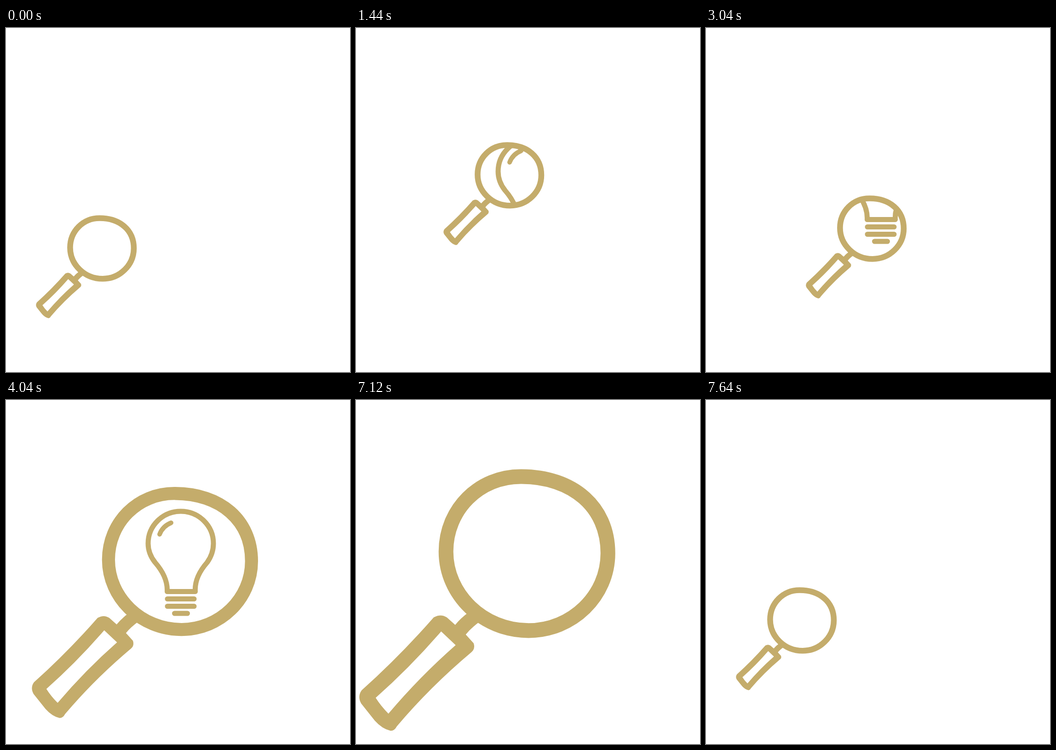
Animation, 748 px wide and 748 px high, one loop 8.64 s. Source, as an HTML page:

```html
<!DOCTYPE html>
<html lang="en">
<head>
<meta charset="utf-8">
<title>Magnifier finds a light bulb</title>
<style>
  html, body { margin: 0; height: 100%; overflow: hidden; background: #fff; }
  svg { display: block; width: 100%; height: 100%; }
  .line { fill: none; stroke: #c4ac6b; stroke-width: 11; stroke-linecap: round; stroke-linejoin: round; }
  .rim { stroke-width: 33.5; }
  .handle { fill: #c4ac6b; fill-rule: evenodd; }
</style>
</head>
<body>
<svg viewBox="0 0 748 748">
  <defs>
    <path id="lens" d="M372 147.5C488 148 568.5 216 568.5 322C568.5 419 487 498 388 498C284 498 200 416 200 318C200 223 275 146.5 372 147.5Z"/>
    <clipPath id="view"><use id="hole" href="#lens"/></clipPath>
  </defs>
  <g clip-path="url(#view)" class="line">
    <g id="bulb">
      <path d="M350.5 416.5Q352 385 324 353Q309 334 309 312A71 70 0 0 1 451 312Q451 334 437.5 353Q409.5 385 411.5 416.5Z"/>
      <path d="M351 432.5H409M351 448.5H409M366.5 464H394.5"/>
      <path d="M334 292Q341 274 359 267" stroke-width="10"/>
    </g>
    <path id="rays"/>
  </g>
  <g id="glass">
    <use href="#lens" class="line rim"/>
    <path class="handle" d="M221 485L202 468Q188 459 172 468Q95 556 8 634Q-2 648 7 664L38 703Q55 722 74 726Q83 726 88 716Q164 626 258 547Q267 540 263 527L245 507Q257 492 279 476L252 456Q233 470 221 485Z
      M189 500L222 531Q140 603 69 687Q52 670 40 651Q118 582 189 500Z"/>
  </g>
</svg>
<script>
  const LOOP = 8640, TICK = 40, SMALL = 0.376;
  const $ = id => document.getElementById(id);

  // Magnifier poses: x, y, scale
  const start = [64.2, 358, SMALL];
  const moves = [
    { at: 1000, steps: 12, to: [189.2, 199, SMALL] },
    { at: 1800, steps: 12, to: [302.2, 146, SMALL] },
    { at: 2600, steps: 12, to: [216.2, 315, SMALL] },
    { at: 3720, steps: 12, to: [0, 0, 1] },
    { at: 7120, steps: 14, to: start }
  ];

  // Linear progress in whole ticks; the first step shows at once.
  const progress = (t, at, steps) =>
    Math.max(0, Math.min(1, (Math.floor((t - at) / TICK) + 1) / steps));

  const polar = (radius, degrees) => {
    const a = degrees * Math.PI / 180;
    return `${379 + radius * Math.cos(a)} ${314 + radius * Math.sin(a)}`;
  };
  $('rays').setAttribute('d', [-225, -180, -135, -90, -45, 0, 45]
    .map(a => `M${polar(102, a)}L${polar(135.5, a)}`).join(''));

  function draw() {
    const t = performance.now() % LOOP;
    let pose = start;
    for (const { at, steps, to } of moves) {
      const p = progress(t, at, steps);
      pose = pose.map((v, i) => v + (to[i] - v) * p);
    }
    const [x, y, scale] = pose;
    for (const id of ['glass', 'hole'])
      $(id).setAttribute('transform', `translate(${x} ${y}) scale(${scale})`);

    $('rays').style.opacity = progress(t, 4520, 6) - progress(t, 4920, 6);
    $('bulb').style.opacity = 1 - progress(t, 6120, 7);
    requestAnimationFrame(draw);
  }
  draw();
</script>
</body>
</html>
```
